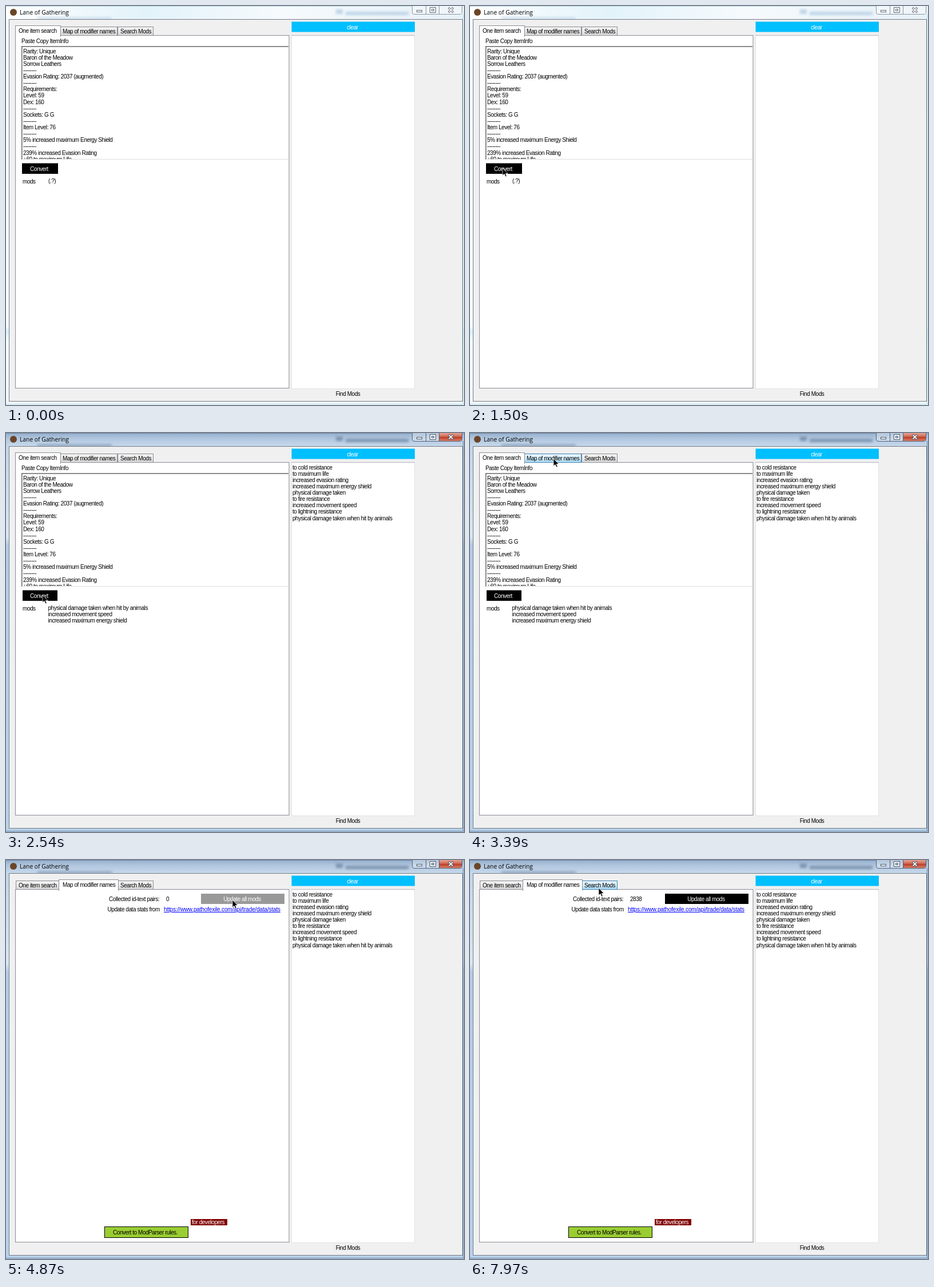
An HTML page that plays this animation: 801 px wide and 699 px high, repeating every 8 s.

```html
<!DOCTYPE html>
<html lang="en">
<head>
<meta charset="utf-8">
<title>Item search tool</title>
<style>
html, body { margin: 0; height: 100%; overflow: hidden; background: #f0f0f0; }
svg { display: block; }
text { font: 10px "Liberation Sans", Arial, sans-serif; letter-spacing: -.45px; white-space: pre; }
.title { font: 10.3px "Open Sans", sans-serif; letter-spacing: 0; }
.mid { text-anchor: middle; }
.link { letter-spacing: -.165px; text-decoration: underline; }
</style>
</head>
<body>
<svg id="stage" width="801" height="699" viewBox="0 0 801 699">
  <defs>
    <linearGradient id="tabFill" x2="0" y2="1"><stop stop-color="#f3f3f3"/><stop offset=".5" stop-color="#ebebeb"/><stop offset="1" stop-color="#d6d6d6"/></linearGradient>
    <linearGradient id="hotFill" x2="0" y2="1"><stop stop-color="#eaf6fd"/><stop offset=".5" stop-color="#d5eefb"/><stop offset="1" stop-color="#a7d9f5"/></linearGradient>
    <linearGradient id="idleSide" x2="0" y2="1"><stop stop-color="#f3f8fc"/><stop offset=".8" stop-color="#fafdff"/><stop offset=".815" stop-color="#d9f0f9"/><stop offset=".84" stop-color="#f4fbfd"/><stop offset="1" stop-color="#f1f8fb"/></linearGradient>
    <linearGradient id="activeSide" x2="0" y2="1"><stop stop-color="#bfd3ea"/><stop offset=".26" stop-color="#d8e6f4"/><stop offset=".28" stop-color="#b4cce6"/><stop offset="1" stop-color="#b9d1ea"/></linearGradient>
    <linearGradient id="idleBar"><stop stop-color="#fff"/><stop offset=".3" stop-color="#e2f3fa"/><stop offset=".6" stop-color="#f6fafd"/><stop offset="1" stop-color="#e6f1f8"/></linearGradient>
    <linearGradient id="activeBar" x2="0" y2="1"><stop stop-color="#94adcb"/><stop offset=".4" stop-color="#b0c6df"/><stop offset="1" stop-color="#c6d8eb"/></linearGradient>
    <linearGradient id="closeFill" x2="0" y2="1"><stop stop-color="#e4a193"/><stop offset=".45" stop-color="#cf6b55"/><stop offset=".5" stop-color="#b93a22"/><stop offset="1" stop-color="#d9806a"/></linearGradient>
    <filter id="soft" x="-5%" y="-50%" width="110%" height="200%"><feGaussianBlur stdDeviation="2"/></filter>
    <clipPath id="infoClip"><path d="M28 71H494V268H28Z"/></clipPath>
  </defs>
</svg>
<script>
const rect = (x, y, w, h, fill) => `<rect x="${x}" y="${y}" width="${w}" height="${h}" fill="${fill}"/>`;
const box = (x, y, w, h, fill, line) =>
  `<rect x="${x + .5}" y="${y + .5}" width="${w - 1}" height="${h - 1}" fill="${fill}" stroke="${line}"/>`;
const text = (x, y, str, fill = '#000', cls = '') => `<text x="${x}" y="${y}" fill="${fill}" class="${cls}">${str}</text>`;
const lines = (x, y, list) => list.map((str, i) => text(x, y + i * 11.13, str)).join('');
const group = (id, ...parts) => `<g id="${id}">${parts.join('')}</g>`;

const GREY = '#898c95';
const tab = (x, w, label, tx, fill = 'url(#tabFill)', line = GREY) =>
  box(x, 36, w, 16, fill, line) + text(tx, 48, label);
const openTab = (x, w, label, tx) =>
  box(x, 34, w, 20, '#fff', GREY) + rect(x + 1, 52, w - 2, 3, '#fff') + text(tx, 46.5, label);
const page = box(16, 51, 479.5, 619, '#fff', GREY);

function chrome(id, bar, side, blur, edge, outline, close, glyph) {
  const buttons = `<path d="M710.5 0V11Q710.5 14.5 714 14.5H794Q797.5 14.5 797.5 11V0" fill="#fff" fill-opacity=".3" stroke="${edge}"/>
    <path d="M758 0H797V11Q797 14 794 14H758Z" fill="${close}"/>
    <path d="M734.5 0V14M757.5 0V14" stroke="${edge}"/>
    <g fill="#fff" stroke="${glyph}"><rect x="718.5" y="7.5" width="9" height="3"/>
    <path d="M741.500 2.500H751.500V11.500H741.500ZM744.500 5.500H748.500V8.500H744.500Z" fill-rule="evenodd"/></g>
    <path d="M774 3L782 11M782 3L774 11" stroke="${glyph}" stroke-width="3.4"/>
    <path d="M774.600 3.600L781.400 10.400M781.400 3.600L774.600 10.400" stroke="#fff" stroke-width="1.7"/>`;
  return group(id, rect(0, 0, 801, 699, side), rect(0, 0, 801, 23, bar),
    `<g filter="url(#soft)">${rect(577, 6, 12, 8, blur)}${rect(594, 10, 110, 6, blur)}${rect(55, 20, 130, 3, blur)}</g>`,
    rect(0, 0, 710, 1, outline), rect(0, 697, 801, 1, outline), rect(799, 14, 1, 684, outline), buttons);
}

const itemInfo = ['Rarity: Unique', 'Baron of the Meadow', 'Sorrow Leathers', '--------',
  'Evasion Rating: 2037 (augmented)', '--------', 'Requirements:', 'Level: 59', 'Dex: 160', '--------',
  'Sockets: G G', '--------', 'Item Level: 76', '--------', '5% increased maximum Energy Shield', '--------',
  '239% increased Evasion Rating', '+60 to maximum Life'];
const hitMod = 'physical damage taken when hit by animals';
const modList = ['to cold resistance', 'to maximum life', 'increased evasion rating',
  'increased maximum energy shield', 'physical damage taken', 'to fire resistance',
  'increased movement speed', 'to lightning resistance', hitMod];

const stage = document.getElementById('stage');
stage.insertAdjacentHTML('beforeend', [
  chrome('idle', 'url(#idleBar)', 'url(#idleSide)', '#bfd6e8', '#8f979f', '#b9dce8', '#f0f5f9', '#5c6670'),
  chrome('active', 'url(#activeBar)', 'url(#activeSide)', '#7f96b2', '#52647a', '#6d87a6', 'url(#closeFill)', '#465468'),
  '<circle cx="13" cy="11" r="6" fill="#6b4528"/>',
  text(24, 15, 'Lane of Gathering', '#000', 'title'),
  box(5, 23, 794, 670, '#f0f0f0', '#747b84'),
  rect(499.5, 27.5, 215.5, 18, '#00bfff'), text(606, 40.5, 'clear', '#fff', 'mid'),
  box(499, 51, 216, 620, '#fff', '#e3e3e3'), rect(499, 51, 216, 1, '#b4b6bb'),
  text(598, 683, 'Find Mods', '#000', 'mid'),
  group('found', lines(501, 63.5, modList)),

  group('itemPage', page,
    tab(95, 100, 'Map of modifier names', 99),
    group('mapHot', tab(95, 100, 'Map of modifier names', 99, 'url(#hotFill)', '#3c7fb1')),
    tab(195, 63, 'Search Mods', 200),
    openTab(16, 80, 'One item search', 22),
    text(27, 65, 'Paste Copy ItemInfo'),
    rect(27, 70.3, 467, 1.4, '#5c5c5c'), rect(27, 70.3, 1.5, 198.7, '#696969'), rect(28, 268, 466, 1, '#dedede'),
    `<g clip-path="url(#infoClip)">${lines(30, 82.5, itemInfo)}</g>`,
    '<rect id="convert" y="275.5" height="18.5"/>', text(58, 289, 'Convert', '#fff', 'mid'),
    text(29, 310.5, 'mods'),
    group('empty', text(74, 309.5, '(.?)')),
    group('picked', lines(73.5, 309.5, [hitMod, modList[6], modList[3]]))),

  group('mapPage', page,
    tab(17, 76, 'One item search', 22),
    tab(196, 62, 'Search Mods', 200),
    group('searchHot', tab(196, 62, 'Search Mods', 200, 'url(#hotFill)', '#3c7fb1')),
    openTab(92, 105, 'Map of modifier names', 99),
    text(180, 72, 'Collected id-text pairs:'),
    '<text id="count" x="280" y="72"></text>',
    '<rect id="update" y="59" height="18"/>', text(413, 72, 'Update all mods', '#fff', 'mid'),
    text(177.5, 90, 'Update data stats from'),
    text(276, 90, 'https://www.pathofexile.com/api/trade/data/stats', '#00f', 'link'),
    rect(323, 629, 64, 11, '#800000'), text(325, 638, 'for developers', '#fff'),
    box(172, 642, 147, 20, '#9acd32', '#000'), text(243.5, 656, 'Convert to ModParser rules.', '#000', 'mid')),

  '<path id="cursor" d="M0 0V13L3 10.200L5.200 15L7.200 14.100L5.100 9.500H9.200Z" stroke="#fff" stroke-width=".7"/>'
].join(''));

// Pointer stops: time, x, y; linear between them.
const stops = [
  [280, 700, 650], [430, 548, 442], [520, 460, 340], [730, 194, 97], [810, 150, 63], [890, 140, 80],
  [1040, 114, 200], [1120, 108, 208], [1300, 76, 256], [1500, 57, 284], [2139, 57, 284], [2140, 64, 284],
  [2780, 64, 284], [2840, 68, 270], [3090, 112, 140], [3310, 145, 52], [3390, 146, 45], [3780, 146, 45],
  [3850, 170, 68], [4080, 288, 185], [4180, 310, 208], [4320, 345, 160], [4480, 378, 95],
  [4640, 390, 70], [4720, 392, 73], [4870, 396, 70], [7040, 396, 70], [7180, 325, 42],
  [7260, 264, 36], [7350, 225, 53], [7430, 205, 54], [7600, 205, 54], [7660, 210, 50], [7970, 225, 49]];

function pointer(t) {
  const i = stops.findIndex(s => s[0] > t);
  if (i < 0) return stops[stops.length - 1].slice(1);
  if (!i) return stops[0].slice(1);
  const [t0, x0, y0] = stops[i - 1], [t1, x1, y1] = stops[i];
  const k = (t - t0) / (t1 - t0);
  return [x0 + (x1 - x0) * k, y0 + (y1 - y0) * k];
}

const el = id => document.getElementById(id);
const show = (id, on) => el(id).style.display = on ? '' : 'none';
// A black button turns grey while pressed and loses its 1px border afterwards.
function pushButton(id, x, w, t, down, up) {
  const inset = t >= down ? 1 : 0;
  el(id).setAttribute('x', x + inset);
  el(id).setAttribute('width', w - 2 * inset);
  el(id).setAttribute('fill', t >= down && t < up ? '#999' : '#000');
}

function draw(now) {
  const t = now % 8000;
  show('idle', t < 1670);
  show('active', t >= 1670);
  show('found', t >= 2540);
  show('picked', t >= 2540);
  show('empty', t < 2540);
  show('itemPage', t < 3570);
  show('mapPage', t >= 3570);
  show('mapHot', t >= 3310);
  show('searchHot', t >= 7660);
  pushButton('convert', 28, 63, t, 1670, 1840);
  pushButton('update', 340, 148, t, 4870, 5020);
  el('count').textContent = t < 6490 ? '0' : '2838';
  show('cursor', t >= 280);
  el('cursor').setAttribute('transform', `translate(${pointer(t)})`);
  requestAnimationFrame(draw);
}
requestAnimationFrame(draw);
</script>
</body>
</html>
```
